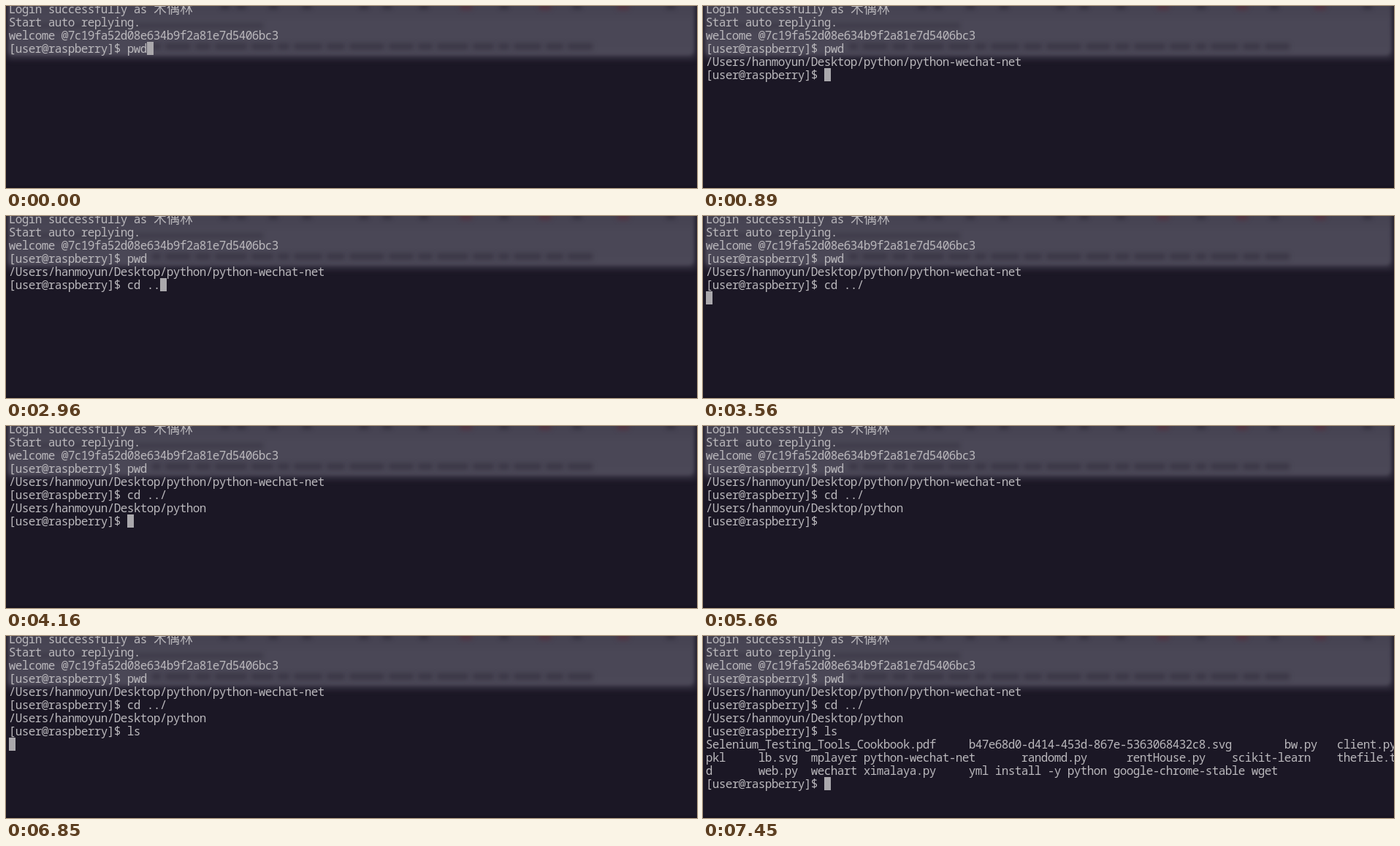
These frames come from a looping animation (946x249 px, 8 s). An HTML page with a canvas:

```html
<!DOCTYPE html>
<html lang="en">
<head>
<meta charset="utf-8">
<title>Terminal session</title>
<style>
  html, body { margin: 0; width: 100%; height: 100%; overflow: hidden; background: #1b1725; }
  canvas { display: block; }
</style>
</head>
<body>
<canvas id="stage" width="946" height="249"></canvas>
<script>
const W = 946, H = 249, LOOP = 8000;
const CELL = 9, ROW = 18, LEFT = 4, TOP = -5, BASE = 15;
const INK = '#bab8bc', CURSOR = '#aaa8ac';
const MONO = '16px "Noto Sans Mono", monospace';
const WIDE = '17.5px "Noto Sans CJK SC", "Noto Sans CJK", sans-serif';

const PROMPT = '[user@raspberry]$ ';
const HOME = '/Users/hanmoyun/Desktop/python';
const ctx = document.getElementById('stage').getContext('2d');
ctx.textAlign = 'center';

const intro = [
  'Login successfully as 木偶林',
  'Start auto replying.',
  'welcome @7c19fa52d08e634b9f2a81e7d5406bc3'
];
const pwdOut = HOME + '/python-wechat-net';
const listing = [
  'Selenium_Testing_Tools_Cookbook.pdf\tb47e68d0-d414-453d-867e-5363068432c8.svg\tbw.py\tclient.py',
  'pkl\tlb.svg\tmplayer\tpython-wechat-net\trandomd.py\trentHouse.py\tscikit-learn\tthefile.txt',
  'd\tweb.py\twechart\tximalaya.py\tyml install -y python google-chrome-stable wget'
];

// Each event adds text to the session or switches the cursor.
const events = [
  [0, [...intro, PROMPT + 'pwd'].join('\n')],
  [290, '\n'],
  [890, pwdOut + '\n' + PROMPT],
  [1480, '', false],
  [1930, ''],
  [2370, 'c'],
  [2520, 'd '],
  [2820, '.'],
  [2960, '.'],
  [3110, '/'],
  [3560, '\n'],
  [4160, HOME + '\n' + PROMPT],
  [5660, '', false],
  [6250, ''],
  [6550, 'l'],
  [6700, 's'],
  [6850, '\n'],
  [7450, listing.join('\n') + '\n' + PROMPT]
];

function makeBackdrop() {
  const layer = document.createElement('canvas');
  layer.width = W;
  layer.height = H;
  const g = layer.getContext('2d');
  const blob = (x, y, w, h, color) => {
    g.fillStyle = color;
    g.fillRect(x, y, w, h);
  };
  const panel = (x, w, bottom, fill) => {
    g.fillStyle = fill;
    g.beginPath();
    g.roundRect(x, -30, w, bottom + 30, 7);
    g.fill();
  };

  blob(0, 0, W, H, '#1b1725');

  // Frosted panel with a soft lower edge
  g.filter = 'blur(3px)';
  panel(0, W, 74, '#302c3b');
  g.filter = 'blur(2px)';
  const shade = g.createLinearGradient(0, 0, 0, 70);
  shade.addColorStop(0, '#454251');
  shade.addColorStop(0.3, '#4a4756');
  shade.addColorStop(1, '#4b4857');
  panel(3, W - 7, 68, shade);

  // Blurred content showing through
  g.filter = 'blur(3px)';
  blob(4, 23, 348, 8, 'rgba(42,38,52,.32)');
  for (let x = 200, i = 0; x < 800; i++) {
    const w = 12 + (i * 23) % 37;
    blob(x, 51, Math.min(w, 803 - x), 9, 'rgba(38,34,48,.4)');
    x += w + 6;
  }
  for (const x of [300, 322, 366, 412, 490, 522, 572, 682, 782, 910])
    blob(x - 6, -4, 12, 8, 'rgba(35,30,44,.5)');
  for (const x of [630, 738, 845])
    blob(x - 8, -4, 16, 9, 'rgba(90,42,58,.6)');

  g.filter = 'none';
  blob(0, H - 3, W, 3, '#181421');
  return layer;
}

function expandTabs(line) {
  return line.split('\t').reduce((out, part) =>
    out.padEnd((Math.floor(out.length / 8) + 1) * 8) + part);
}

// Puts each character in its terminal cell; Chinese ones take two.
function drawLine(line, row) {
  const y = TOP + row * ROW + BASE;
  let x = LEFT;
  ctx.fillStyle = INK;
  for (const ch of expandTabs(line)) {
    const wide = ch > '\x7f';
    const w = wide ? 2 * CELL : CELL;
    ctx.font = wide ? WIDE : MONO;
    ctx.fillText(ch, x + w / 2, y);
    x += w;
  }
}

const backdrop = makeBackdrop();
const start = performance.now();

function draw() {
  const t = (performance.now() - start) % LOOP;
  const past = events.filter(([at]) => at <= t);
  const lines = past.map(([, text]) => text).join('').split('\n');
  const cursorOn = past[past.length - 1][2] !== false;

  ctx.drawImage(backdrop, 0, 0);
  lines.forEach(drawLine);
  if (cursorOn) {
    const row = lines.length - 1;
    ctx.fillStyle = CURSOR;
    ctx.fillRect(LEFT + lines[row].length * CELL, TOP + row * ROW, CELL, ROW);
  }
  requestAnimationFrame(draw);
}
draw();
</script>
</body>
</html>
```
